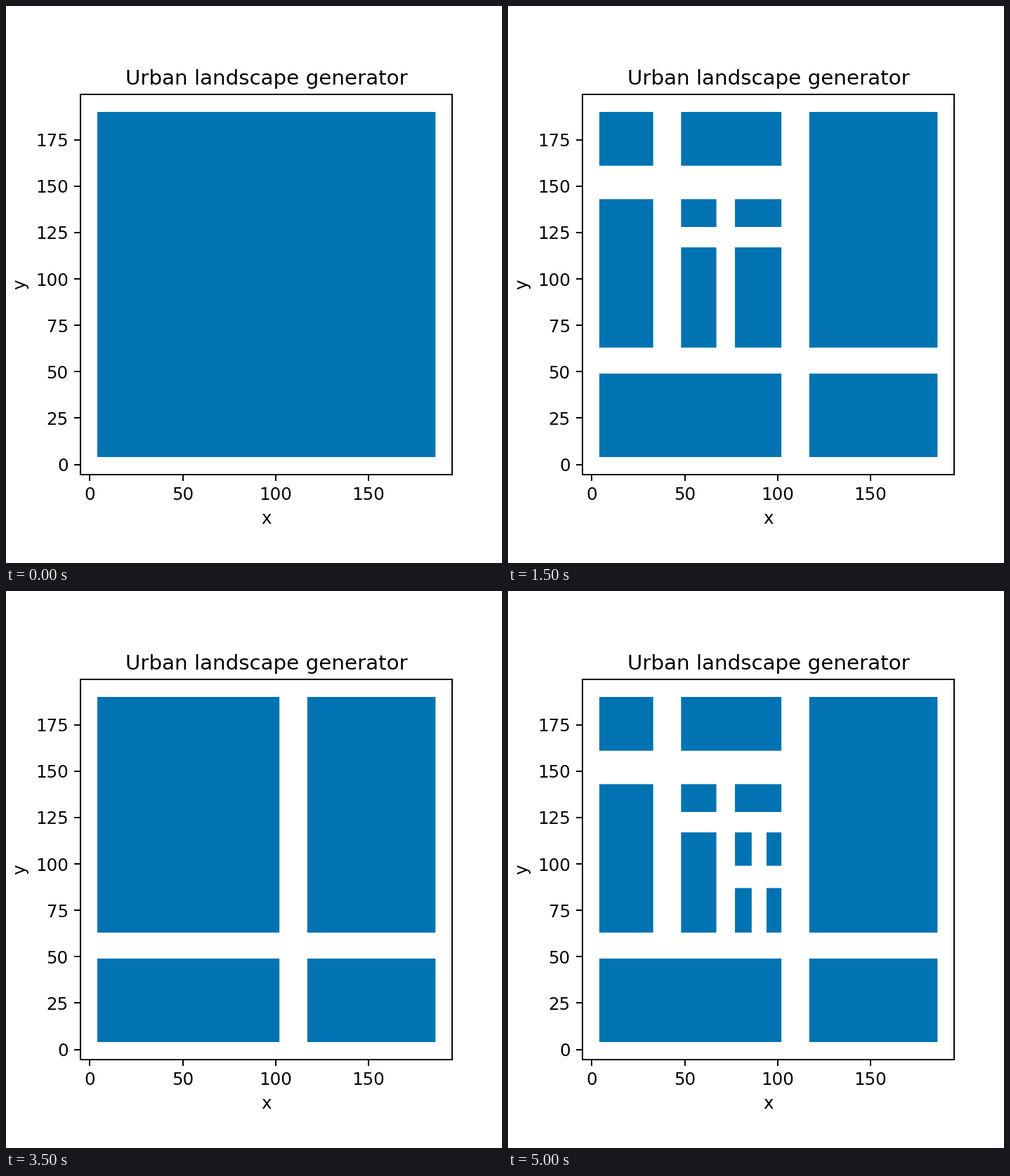
Animation of 706 by 794 pixels, one loop 6000 ms. Source, as a matplotlib script:

```python
import matplotlib.pyplot as plt
from matplotlib.animation import FuncAnimation
from matplotlib.collections import PolyCollection

plt.rcParams["font.family"] = "DejaVu Sans"

LOT = (4, 186, 4, 190)  # x0, x1, y0, y1
# Each crossing: the vertical street's x range, then the horizontal street's y range.
CROSSINGS = [
    (102, 117, 49, 63),
    (33, 48, 143, 161),
    (67, 77, 117, 128),
    (86, 94, 87, 99),
]
STEPS_PER_CYCLE = 6  # the finished layout is held for two steps
CYCLES = 2


def split(block, crossing):
    """Cut a block into four around a crossing that lies inside it."""
    x0, x1, y0, y1 = block
    left, right, low, high = crossing
    if not (x0 < left and right < x1 and y0 < low and high < y1):
        return [block]
    return [(a, b, c, d)
            for a, b in ((x0, left), (right, x1))
            for c, d in ((y0, low), (high, y1))]


def layout(depth):
    blocks = [LOT]
    for crossing in CROSSINGS[:depth]:
        blocks = [part for block in blocks for part in split(block, crossing)]
    return blocks


def corners(block):
    x0, x1, y0, y1 = block
    return [(x0, y0), (x1, y0), (x1, y1), (x0, y1)]


def padded(low, high, margin=0.05):
    pad = margin * (high - low)
    return low - pad, high + pad


fig = plt.figure(figsize=(4, 4.4986), dpi=176.5, facecolor="white")
ax = fig.add_axes([0.15, 0.1, 0.75, 0.8])
ax.set(xlim=padded(*LOT[:2]), ylim=padded(*LOT[2:]),
       xticks=range(0, 151, 50), yticks=range(0, 176, 25),
       xlabel="x", ylabel="y", title="Urban landscape generator")
ax.set_aspect("equal")

city = PolyCollection([corners(LOT)], facecolor="#0173b2", edgecolor="none",
                      linewidth=0, snap=False)
ax.add_collection(city, autolim=False)


def update(frame):
    depth = min(frame % STEPS_PER_CYCLE, len(CROSSINGS))
    city.set_verts([corners(block) for block in layout(depth)])
    return [city]


anim = FuncAnimation(fig, update, frames=STEPS_PER_CYCLE * CYCLES,
                     interval=500, repeat=True, repeat_delay=0, blit=False)
plt.show()
```
